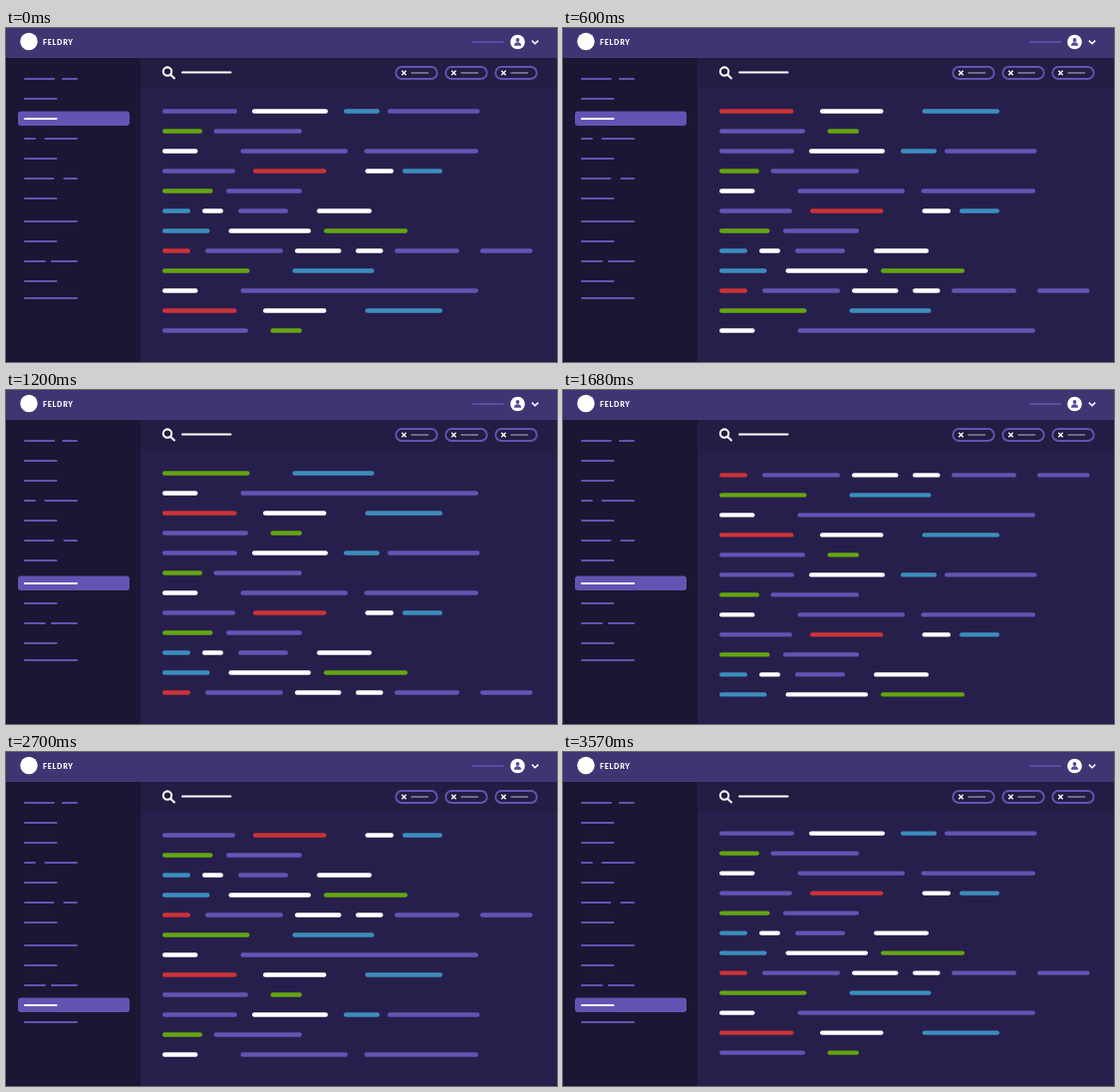
An HTML page that plays this animation: 553x335 px, repeating every 3600 ms.

```html
<!DOCTYPE html>
<html lang="en">
<head>
<meta charset="utf-8">
<title>Log viewer</title>
<style>
  html, body { margin: 0; width: 100%; height: 100%; overflow: hidden; background: #271f4b; }
  svg { display: block; width: 553px; height: 335px; }
  .brand { font: 900 7px Lato, sans-serif; letter-spacing: .8px; fill: #fff; }
</style>
</head>
<body>
<svg id="stage" viewBox="0 0 553 335">
  <rect width="553" height="335" fill="#271f4b"/>
  <rect x="135" y="30" width="418" height="30" fill="#231c43"/>
  <rect y="30" width="135" height="305" fill="#1b1633"/>
  <rect width="553" height="30" fill="#3f3573"/>

  <circle cx="23" cy="13.5" r="8.7" fill="#fff"/>
  <text class="brand" x="37" y="16.6">FELDRY</text>

  <rect x="468" y="13.2" width="32" height="1.6" rx=".8" fill="#6254b2"/>
  <circle cx="513.5" cy="14" r="7.3" fill="#fff"/>
  <g fill="#5648a0">
    <circle cx="513.5" cy="12" r="1.9"/>
    <path d="M509.9 17.8c0-4.6 7.2-4.6 7.2 0z"/>
  </g>
  <path d="M527.8 12.6l3.2 3.2 3.2-3.2" fill="none" stroke="#fff" stroke-width="1.5"/>

  <g fill="none" stroke="#fff" stroke-width="2.1" stroke-linecap="round">
    <circle cx="162" cy="43.6" r="4.2"/>
    <path d="M165.3 46.9l3.7 3.5"/>
  </g>
  <rect x="176" y="43.4" width="50.5" height="2" rx="1" fill="#fff"/>

  <g id="pills"></g>
  <g id="menu"></g>
  <g id="log"></g>
</svg>
<script>
const PURPLE = '#6254b2', WHITE = '#fff', RED = '#cc3338', BLUE = '#3c8dbe', GREEN = '#64a512';
const PITCH = 20, STEP_MS = 300, LOOP_MS = 3600;

// Each bar: color, left, right
const LOG = [
  [[PURPLE, 157, 232], [WHITE, 247, 323], [BLUE, 339, 375], [PURPLE, 383, 475.5]],
  [[GREEN, 157, 197], [PURPLE, 208.5, 297]],
  [[WHITE, 157, 192.5], [PURPLE, 235.5, 343], [PURPLE, 359.5, 474]],
  [[PURPLE, 157, 230], [RED, 248, 321.5], [WHITE, 360.5, 389], [BLUE, 398, 438]],
  [[GREEN, 157, 207.5], [PURPLE, 221, 297]],
  [[BLUE, 157, 185], [WHITE, 197, 218], [PURPLE, 233, 283], [WHITE, 312, 367]],
  [[BLUE, 157, 204.5], [WHITE, 223.5, 306], [GREEN, 319, 403]],
  [[RED, 157, 185], [PURPLE, 200, 278], [WHITE, 290, 336.5], [WHITE, 351, 378.5],
   [PURPLE, 390, 455], [PURPLE, 476, 528.5]],
  [[GREEN, 157, 244.5], [BLUE, 287.5, 369.5]],
  [[WHITE, 157, 192.5], [PURPLE, 235.5, 474]],
  [[RED, 157, 231.5], [WHITE, 258, 321.5], [BLUE, 360.5, 438]],
  [[PURPLE, 157, 243], [GREEN, 265.5, 297]]
];

// Each menu item: center y, then left/right pairs
const MENU = [
  [51, [18, 49], [56, 72]], [71, [18, 51.5]], [91, [18, 51.5]],
  [111, [18, 30], [38.5, 72]], [131, [18, 51.5]], [151, [18, 48.5], [57.5, 72]],
  [171, [18, 51.5]], [194, [18, 72]], [214, [18, 51.5]],
  [234, [18, 40], [45, 72]], [254, [18, 51.5]], [271, [18, 72]]
];

// Selected menu item from each time on
const SELECTION = [[0, 2], [900, 7], [2400, 10]];

const byId = id => document.getElementById(id);

function add(parent, tag, attrs = {}) {
  const node = document.createElementNS('http://www.w3.org/2000/svg', tag);
  for (const key in attrs) node.setAttribute(key, attrs[key]);
  return parent.appendChild(node);
}

function bar(parent, left, right, y, height, fill) {
  return add(parent, 'rect', { x: left, y: y - height / 2, width: right - left, height, rx: height / 2, fill });
}

for (const x of [391, 441, 491]) {
  const pill = add(byId('pills'), 'g', { transform: `translate(${x} 38.7)` });
  add(pill, 'rect', { x: .3, y: .3, width: 41.4, height: 12, rx: 6, fill: 'none', stroke: PURPLE, 'stroke-width': 1.9 });
  add(pill, 'path', { d: 'M6.2 4.1l4.4 4.4m0-4.4l-4.4 4.4', stroke: WHITE, 'stroke-width': 1.4 });
  bar(pill, 15.3, 33.2, 6.3, 1.7, '#8a84a6');
}

const highlight = add(byId('menu'), 'rect', { x: 12, width: 112, height: 14.4, rx: 3, fill: PURPLE });
const items = MENU.map(([y, ...spans]) => {
  const item = add(byId('menu'), 'g');
  spans.forEach(([left, right]) => bar(item, left, right, y, 2, 'inherit'));
  item.querySelectorAll('rect').forEach(line => line.removeAttribute('fill'));
  return item;
});

const rows = LOG.map(bars => {
  const row = add(byId('log'), 'g');
  bars.forEach(([color, left, right]) => bar(row, left, right, 0, 4.4, color));
  return row;
});

// Rest for 180 ms, then ease down one row in 30 ms ticks
function scrollAt(time) {
  const tick = Math.floor((time % STEP_MS) / 30);
  const progress = Math.max(0, tick - 5) / 5;
  const eased = (1 - Math.cos(Math.PI * progress)) / 2;
  return (Math.floor(time / STEP_MS) + eased) * PITCH;
}

function draw(time) {
  const scroll = scrollAt(time), span = rows.length * PITCH, half = PITCH / 2;
  rows.forEach((row, i) => {
    const y = (i * PITCH + scroll + half) % span - half;
    row.setAttribute('transform', `translate(0 ${(83.5 + y).toFixed(2)})`);
  });

  const selected = SELECTION.filter(([start]) => time >= start).pop()[1];
  highlight.setAttribute('y', MENU[selected][0] - 7.4);
  items.forEach((item, i) => item.setAttribute('fill', i === selected ? WHITE : PURPLE));
}

function frame() {
  draw(performance.now() % LOOP_MS);
  requestAnimationFrame(frame);
}
frame();
</script>
</body>
</html>
```
